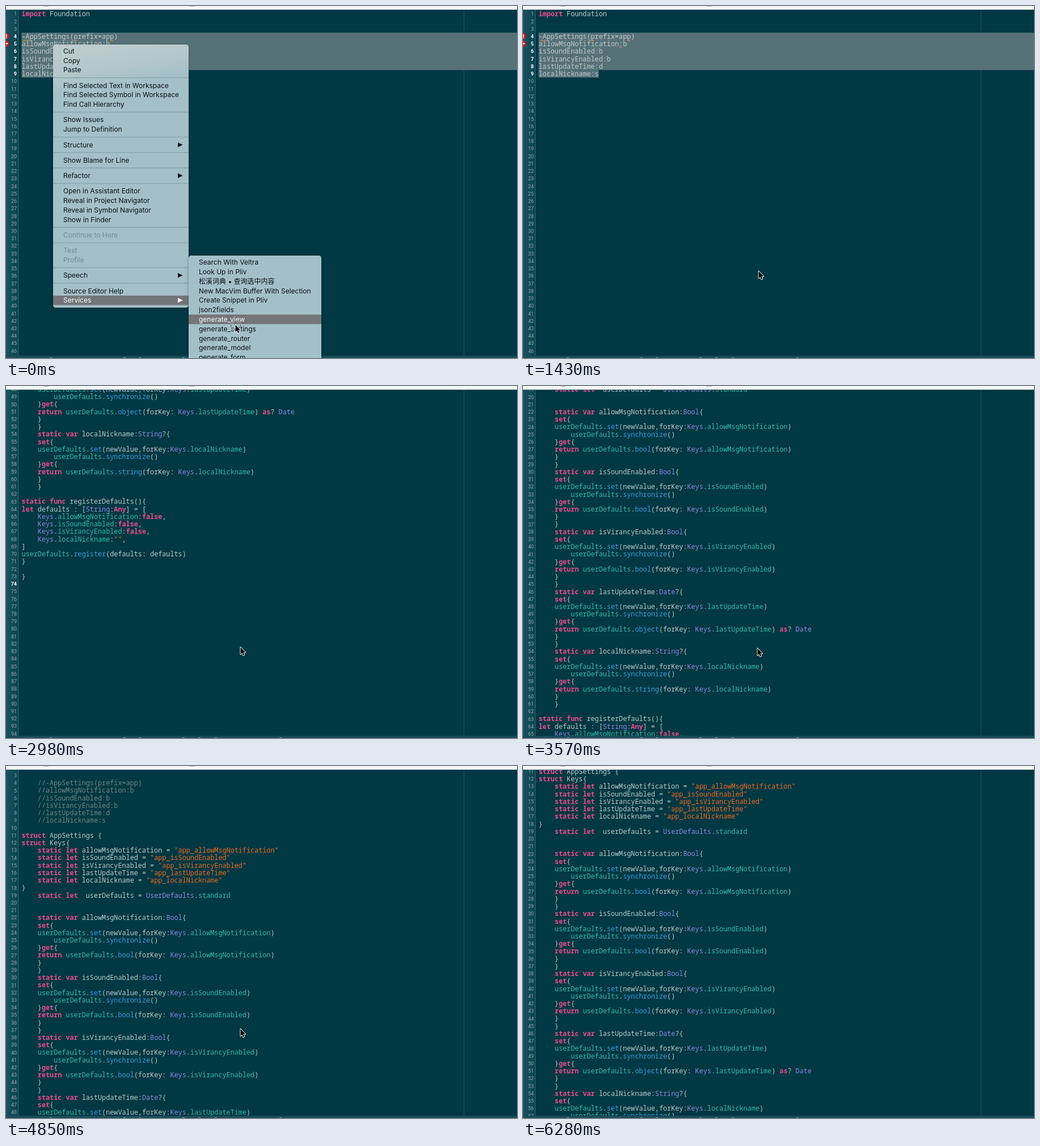
Animation of 901x622 px, one loop 6.91 s. Source, as an HTML page with a canvas:

```html
<!DOCTYPE html>
<html lang="en">
<head>
<meta charset="utf-8">
<title>Generate settings from a selection</title>
<style>
html, body { margin: 0; width: 100%; height: 100%; overflow: hidden; background: #003843; }
canvas { display: block; width: 901px; height: 622px; }
</style>
</head>
<body>
<canvas id="stage" width="901" height="622"></canvas>
<script>
const ctx = document.getElementById('stage').getContext('2d');
const W = 901, H = 622, LOOP = 6910;
const TOP = 7, BOTTOM = 618;
const LINE = 13.23, FIRST = 14, CHAR = 7.08, CODE_X = 27.5;
const ROW = 16.78, GAP = 10.5;
const CODE_FONT = '11.8px "Noto Sans Mono", "DejaVu Sans Mono", monospace';
const MENU_FONT = '12px Inter, "Noto Sans CJK SC", "Noto Sans CJK", sans-serif';
const COLORS = {
  plain: '#bccbcd', kw: '#ea4c93', type: '#9089e2', prop: '#35bda9',
  fn: '#3a9fe2', str: '#ef6a20', note: '#70878c'
};

// Hard steps: [start time, value, ...]
const CURSOR = [
  [0, 404, 563], [90, 407, 575], [240, 407, 583], [330, 408, 588], [510, 408, 586],
  [600, 408, 581], [690, 408, 575], [780, 407, 570], [1250, 409, 555], [1340, 413, 500],
  [1430, 415, 468], [2620, 414, 464], [2710, 413, 461], [3420, 413, 463], [4850, 413, 464]
];
const SCROLL = [
  [0, 0], [2390, 668], [2890, 655], [2980, 630], [3130, 535], [3280, 438], [3420, 340],
  [3570, 246], [3720, 155], [3840, 95], [4040, 40], [4160, 14], [4280, 0],
  [4850, 23.7], [4970, 75], [5090, 112], [5300, 130], [5410, 136.6]
];
const ACTIVE_ROW = [[0, 6], [90, 7], [240, 8], [690, 7], [1060, -1], [1150, 7]];
const MENU_ALPHA = [[0, 1], [1250, 0.6], [1340, 0.25], [1430, 0]];
const RING = [[0, 1], [90, 0], [960, 1], [1150, 0]];
const GENERATED = 2270, LEAVE = 5620, LEAVE_STEP = 94.2;

const at = (track, t) => track.findLast(key => key[0] <= t);

// Editor contents
const fields = [
  ['allowMsgNotification', 'b', 'Bool', 'bool'],
  ['isSoundEnabled', 'b', 'Bool', 'bool'],
  ['isVirancyEnabled', 'b', 'Bool', 'bool'],
  ['lastUpdateTime', 'd', 'Date?', 'object', ' as? Date'],
  ['localNickname', 's', 'String?', 'string']
];
const spec = ['-AppSettings(prefix=app)', ...fields.map(([name, code]) => `${name}:${code}`)];
const before = ['import Foundation', '', '', spec[0].replace('-', '–'), ...spec.slice(1)];
const accessor = ([name, , type, getter, cast = '']) => [
  `    static var ${name}:${type}{`,
  '    set{',
  `    userDefaults.set(newValue,forKey:Keys.${name})`,
  '        userDefaults.synchronize()',
  '    }get{',
  `    return userDefaults.${getter}(forKey: Keys.${name})${cast}`,
  '    }',
  '    }'
];
const after = [
  'import Foundation', '', '',
  ...spec.map(s => '    //' + s), '',
  'struct AppSettings {', 'struct Keys{',
  ...fields.map(([name]) => `    static let ${name} = "app_${name}"`),
  '}',
  '    static let  userDefaults = UserDefaults.standard', '', '',
  ...fields.flatMap(accessor), '',
  'static func registerDefaults(){',
  'let defaults : [String:Any] = [',
  ...fields.slice(0, 3).map(([name]) => `    Keys.${name}:false,`),
  '    Keys.localNickname:"",',
  ']',
  'userDefaults.register(defaults: defaults)',
  '}', '', '}', ''
];

const TOKEN = new RegExp([
  '(?<note>//.*)',
  '(?<str>".*?")',
  '(?<kw>\\b(?:import|struct|static|let|var|func|return|get|as|false|Any|set(?=\\{))\\b)',
  '(?<fn>(?<=\\.)\\w+(?=\\())',
  '(?<prop>(?<=\\.)\\w+|\\buserDefaults(?=\\.))',
  '(?<type>\\b(?:Bool|String|Date|UserDefaults|Keys(?=\\.))\\b)',
  '(?<plain>\\w+|[^\\w\\s]+?)'
].join('|'), 'g');

function tokenize(line) {
  return [...line.matchAll(TOKEN)].map(match => ({
    text: match[0],
    x: CODE_X + match.index * CHAR,
    kind: Object.keys(match.groups).find(k => match.groups[k] !== undefined)
  }));
}
const beforeTokens = before.map(tokenize);
const afterTokens = after.map(tokenize);

function rect(x, y, w, h, color) {
  ctx.fillStyle = color;
  ctx.fillRect(x, y, w, h);
}

function text(str, x, y, color, font) {
  ctx.font = font;
  ctx.fillStyle = color;
  ctx.fillText(str, x, y);
}

function disc(x, y, r, color) {
  ctx.fillStyle = color;
  ctx.beginPath();
  ctx.arc(x, y, r, 0, Math.PI * 2);
  ctx.fill();
}

function drawSelection() {
  const top = FIRST + 2.5 * LINE;
  rect(CODE_X, top, W, 5 * LINE, '#567178');
  rect(CODE_X, top + 5 * LINE, 15 * CHAR, LINE, '#567178');
}

function drawIssues() {
  disc(0, 53, 5.2, '#f01414');
  disc(0, 66.5, 5.2, '#f01414');
  rect(0, 50, 1.4, 4.5, '#fff');
  rect(0, 55.5, 1.4, 1.5, '#fff');
  rect(0, 65.5, 3, 2, '#fff');
  ctx.strokeStyle = '#c98a35';
  ctx.lineWidth = 1.3;
  for (const [x, y] of [[30, 62], [37, 62], [120, 62], [184, 62], [170, 74]]) {
    ctx.beginPath();
    ctx.moveTo(x, y);
    ctx.lineTo(x + 2.5, y - 2);
    ctx.lineTo(x + 5, y);
    ctx.stroke();
  }
}

function drawEditor(t) {
  const generated = t >= GENERATED;
  const scroll = at(SCROLL, t)[1];
  const tokens = generated ? afterTokens : beforeTokens;
  const isCurrent = n => generated ? n === 74 : n >= 4 && n <= 9;

  rect(0, 0, W, H, '#003843');
  const gutter = ctx.createLinearGradient(0, 0, 21, 0);
  gutter.addColorStop(0, '#19525e');
  gutter.addColorStop(1, '#094550');
  rect(0, TOP, 21, BOTTOM - TOP, gutter);
  rect(21, TOP, 1, BOTTOM - TOP, '#3b6770');
  rect(807, TOP, 1, BOTTOM - TOP, '#24525b');

  ctx.save();
  ctx.beginPath();
  ctx.rect(0, TOP, W, BOTTOM - TOP);
  ctx.clip();
  if (!generated) drawSelection();
  const first = Math.max(1, Math.floor(scroll / LINE));
  for (let n = first; n < first + 50; n++) {
    const y = FIRST + (n - 1) * LINE - scroll;
    const current = isCurrent(n);
    ctx.textAlign = 'right';
    text(n, 19, y + 3.3, current ? '#fff' : '#94a9ad',
      (current ? 'bold ' : '') + '9px Roboto, sans-serif');
    ctx.textAlign = 'left';
    for (const { text: str, x, kind } of tokens[n - 1] || []) {
      text(str, x, y + 4.2, COLORS[kind], (kind === 'kw' ? '600 ' : '500 ') + CODE_FONT);
    }
  }
  if (!generated) drawIssues();
  ctx.restore();

  rect(0, 0, W, TOP - 0.5, '#f8f9f9');
  rect(66, 0, 9, 1, '#a9b0b2');
  rect(323, 0, 10, 1, '#a9b0b2');
  rect(0, BOTTOM, W, H - BOTTOM, '#1a4d58');
  for (const x of [77, 207, 234, 311, 339, 368, 482]) rect(x, 621, 4, 1, '#7b979c');
}

// Context menus: "-" separates, "~" disables, ">" opens a submenu
const MAIN = [
  'Cut', 'Copy', 'Paste', '-',
  'Find Selected Text in Workspace', 'Find Selected Symbol in Workspace', 'Find Call Hierarchy', '-',
  'Show Issues', 'Jump to Definition', '-',
  'Structure>', '-', 'Show Blame for Line', '-', 'Refactor>', '-',
  'Open in Assistant Editor', 'Reveal in Project Navigator',
  'Reveal in Symbol Navigator', 'Show in Finder', '-',
  '~Continue to Here', '-', '~Test', '~Profile', '-', 'Speech>', '-',
  'Source Editor Help', 'Services>'
];
const SERVICES = [
  'Search With Veltra', 'Look Up in Pliv', '松溪词典 • 查询选中内容',
  'New MacVim Buffer With Selection', 'Create Snippet in Pliv', 'json2fields',
  'generate_view', 'generate_settings', 'generate_router', 'generate_model', 'generate_form'
];

function drawPanel(x, y, w, h, fill) {
  ctx.save();
  ctx.shadowColor = 'rgba(0,0,0,.35)';
  ctx.shadowBlur = 5;
  ctx.shadowOffsetY = 1;
  ctx.fillStyle = fill;
  ctx.beginPath();
  ctx.roundRect(x, y, w, h, 4.5);
  ctx.fill();
  ctx.restore();
}

function drawItems(items, x, w, y, active) {
  items.forEach((item, i) => {
    if (item === '-') {
      rect(x, y - ROW / 2 + GAP / 2 - 0.8, w, 1.6, '#8ba8b0');
      y += GAP;
      return;
    }
    const on = i === active;
    if (on) rect(x, y - 8.4, w, 16.8, '#747579');
    const color = on ? '#fff' : item[0] === '~' ? '#6f8b93' : '#081216';
    text(item.replace(/[~>]/, ''), x + 18, y + 4.3, color, MENU_FONT);
    if (item.endsWith('>')) {
      ctx.beginPath();
      ctx.moveTo(x + 220, y - 4.3);
      ctx.lineTo(x + 228.5, y);
      ctx.lineTo(x + 220, y + 4.3);
      ctx.fill();
    }
    y += ROW;
  });
}

function drawMenus(t) {
  const alpha = at(MENU_ALPHA, t)[1];
  if (!alpha) return;
  ctx.save();
  ctx.globalAlpha = alpha;
  const glass = ctx.createLinearGradient(195, 68, 207, 138);
  glass.addColorStop(0, '#bccbce');
  glass.addColorStop(0.6, '#b2c6cb');
  glass.addColorStop(1, '#a3c0c8');
  drawPanel(83, 68, 239, 465, glass);
  drawItems(MAIN, 83, 239, 79.5, MAIN.length - 1);
  drawPanel(322, 441, 234, 200, '#a3c0c8');
  drawItems(SERVICES, 322, 234, 453, at(ACTIVE_ROW, t)[1]);
  ctx.restore();
}

function cursorAt(t) {
  const [, x, y] = at(CURSOR, t);
  if (t < LEAVE) return [x, y];
  const p = Math.min(1, (Math.floor((t - LEAVE) / LEAVE_STEP) + 1) / 8);
  if (p === 1) return null;
  const u = p * 8 / 7;
  const ease = u * u * (3 - 2 * u);
  return [x + 465 * ease, y + 145 * ease];
}

function drawCursor(t) {
  const pos = cursorAt(t);
  if (!pos) return;
  ctx.save();
  ctx.translate(...pos);
  if (at(RING, t)[1]) {
    ctx.beginPath();
    ctx.arc(1, 2, 8.5, 0, Math.PI * 2);
    ctx.strokeStyle = 'rgba(255,255,255,.75)';
    ctx.lineWidth = 2.4;
    ctx.stroke();
    ctx.strokeStyle = '#20282b';
    ctx.lineWidth = 1;
    ctx.stroke();
  }
  const arrow = new Path2D('M.5 .5V13.2L3.3 10.6 5.2 15 7.3 14.1 5.4 9.8H9.3Z');
  ctx.lineJoin = 'round';
  ctx.strokeStyle = '#fff';
  ctx.lineWidth = 1.8;
  ctx.stroke(arrow);
  ctx.fillStyle = '#000';
  ctx.fill(arrow);
  ctx.restore();
}

let start;
function frame(now) {
  start ??= now;
  const t = (now - start) % LOOP;
  drawEditor(t);
  drawMenus(t);
  drawCursor(t);
  requestAnimationFrame(frame);
}
requestAnimationFrame(frame);
</script>
</body>
</html>
```
